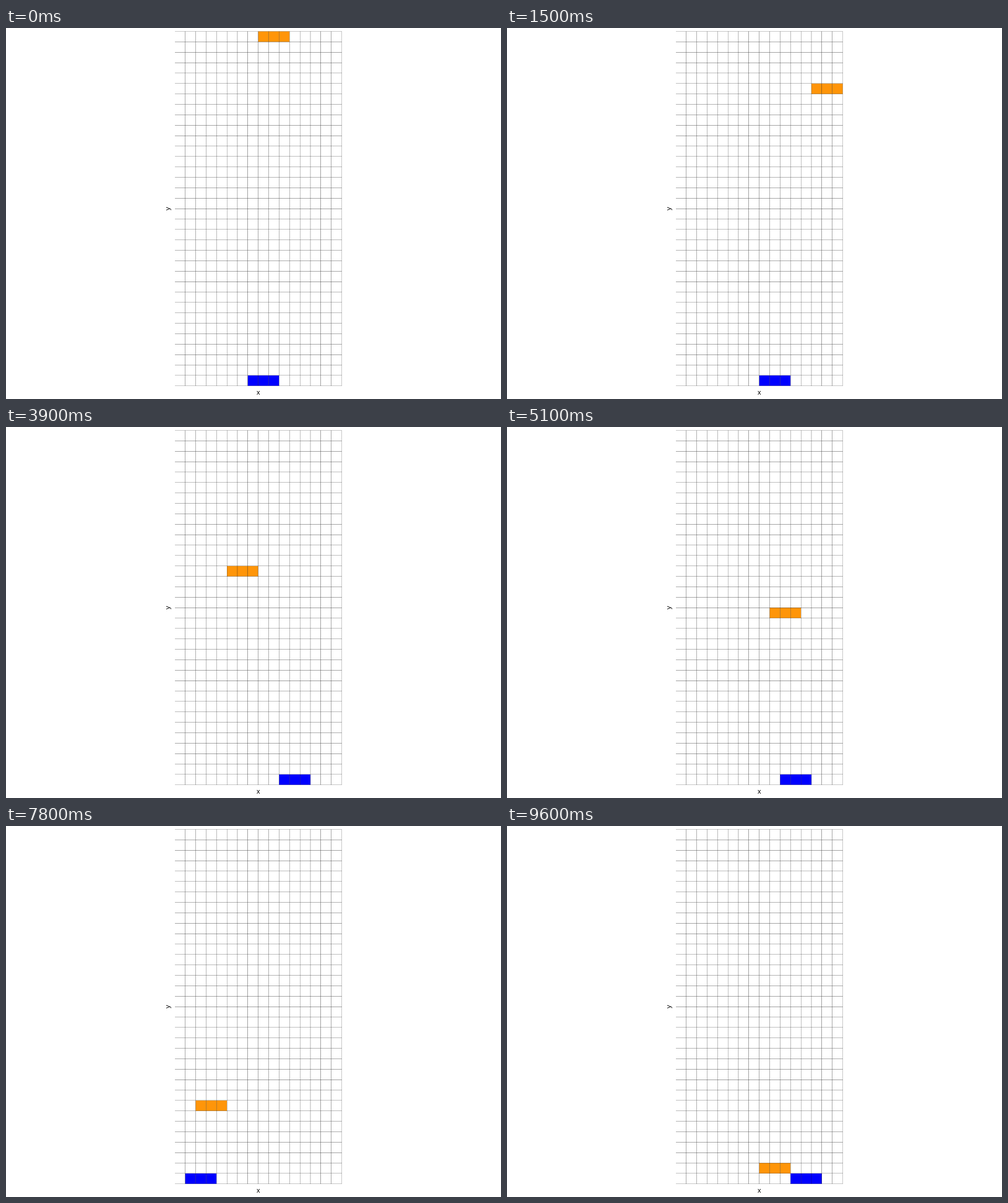
Write a matplotlib script that moves like this. It is 800 by 600 pixels and loops after 9.9 s.

```python
import matplotlib.pyplot as plt
from matplotlib.animation import FuncAnimation
from matplotlib.collections import PolyCollection

W, H = 800, 600
COLS, ROWS = 16, 34
CELL = 16.86
LEFT, TOP = 272.85, 5.48
STEPS, INTERVAL = 33, 300
SPAN = 3
EMPTY, BLOCK, AGENT = "#ffffff", "#ff9509", "#0000ff"
PT = 0.72  # points per pixel at 100 dpi

fig = plt.figure(figsize=(W / 100, H / 100), dpi=100, facecolor="white")
w, h = COLS * CELL, ROWS * CELL
ax = fig.add_axes([LEFT / W, 1 - (TOP + h) / H, w / W, h / H])
ax.set_xlim(0, COLS)
ax.set_ylim(0, ROWS)
ax.set_axis_off()

# Tiles are stacked from the bottom row up, each over its neighbours' edges.
tiles = PolyCollection(
    [[(c, r), (c + 1, r), (c + 1, r + 1), (c, r + 1)]
     for r in range(ROWS) for c in range(COLS)],
    facecolors=[EMPTY] * (ROWS * COLS), edgecolors="black",
    linewidths=0.2134 * PT, antialiaseds=True)
tiles.set_snap(False)
ax.add_collection(tiles, autolim=False)


def label(x, y, s, angle=0):
    fig.text(x / W, 1 - y / H, s, rotation=angle, rotation_mode="anchor",
             ha="center", va="baseline", color="black",
             fontfamily="Liberation Sans", fontsize=11 * PT)


label(LEFT + w / 2, 593, "x")
label(266.2, TOP + h / 2 - 0.6, "y", 90)


def agent_col(i):
    """Drift right, then run left once the block is overhead."""
    return 7 + min(i // 4, 3) - max(0, i - 17)


def paint(colors, row, col, color):
    for k in range(SPAN):
        colors[row * COLS + (col + k) % COLS] = color


def update(i):
    colors = [EMPTY] * (ROWS * COLS)
    paint(colors, ROWS - 1 - i, 8 + i, BLOCK)
    paint(colors, 0, agent_col(i), AGENT)
    tiles.set_facecolor(colors)
    return [tiles]


anim = FuncAnimation(fig, update, frames=STEPS, interval=INTERVAL,
                     repeat=True, repeat_delay=0, blit=False)
plt.show()
```
